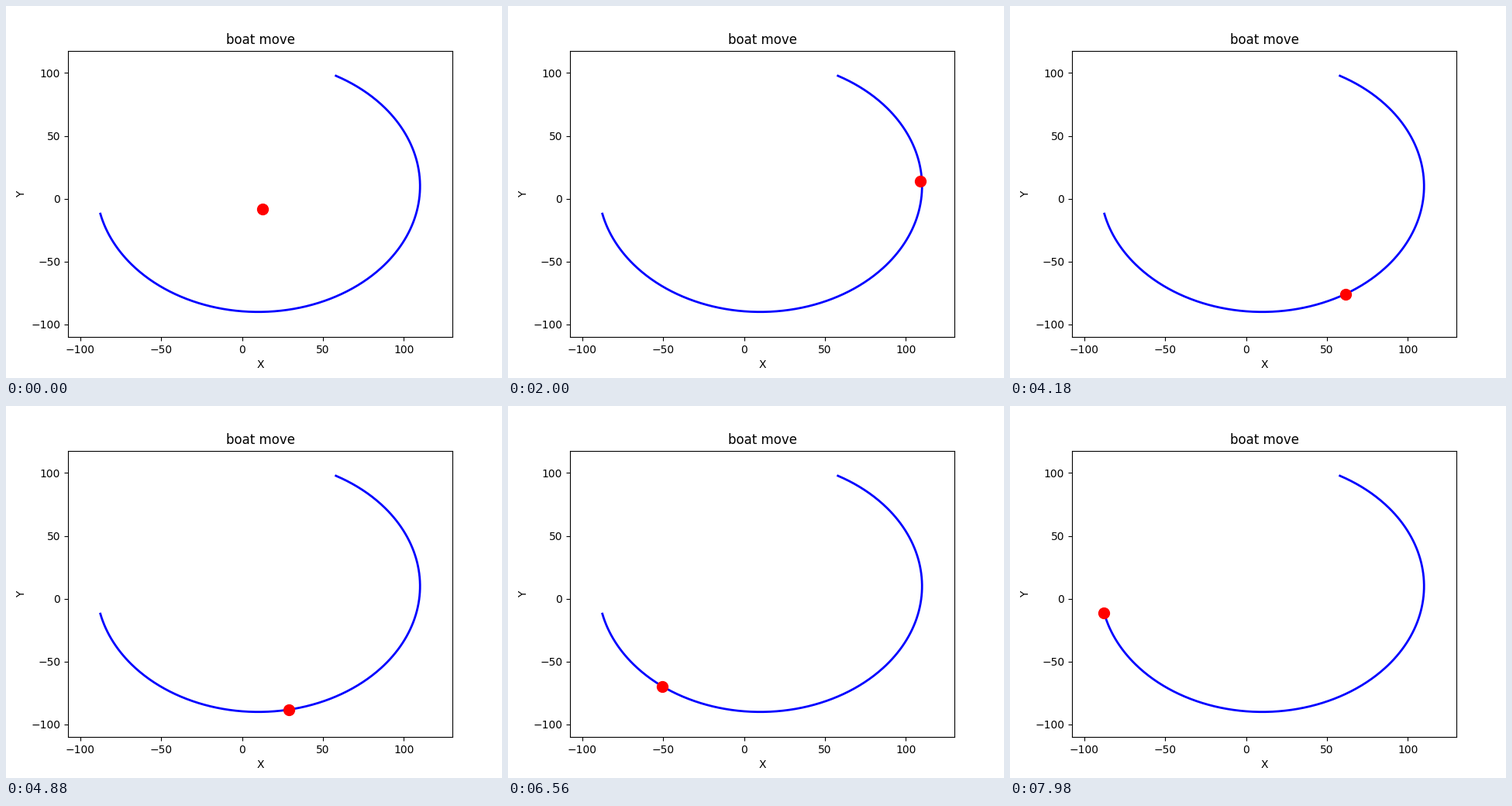
Recreate the animation shown at these times as a matplotlib script. Size 640 by 480 pixels, loop 8 s.

```python
import numpy as np
import matplotlib.pyplot as plt
from matplotlib.animation import FuncAnimation

FRAMES = 400
STEP = 0.01       # radians travelled per frame
START = 1.07      # first angle of the course
DECAY = 0.96      # share of the tracking error kept each frame
BOAT0 = np.array([10.0, -12.0])


def course(i):
    """Point on the clockwise circular course after i steps."""
    a = START - STEP * np.asarray(i)
    return np.array([10 + 100 * np.cos(a), 10 + 100 * np.sin(a)])


def boat_at(i):
    """Boat closing in on the moving course point."""
    return course(i + 1) + (BOAT0 - course(0)) * DECAY ** (i + 1)


x, y = course(np.arange(FRAMES))

fig, ax = plt.subplots(figsize=(6.4, 4.8), dpi=100)
ax.set_xlim(x.min() - 20, x.max() + 20)
ax.set_ylim(y.min() - 20, y.max() + 20)
ax.set_title("boat move")
ax.set_xlabel("X")
ax.set_ylabel("Y")
ax.plot(x, y, color="blue", lw=2)
boat, = ax.plot([], [], "o", color="red", ms=10)


def update(i):
    bx, by = boat_at(i)
    boat.set_data([bx], [by])
    return boat,


anim = FuncAnimation(fig, update, frames=FRAMES, interval=20, repeat=True)
plt.show()
```
